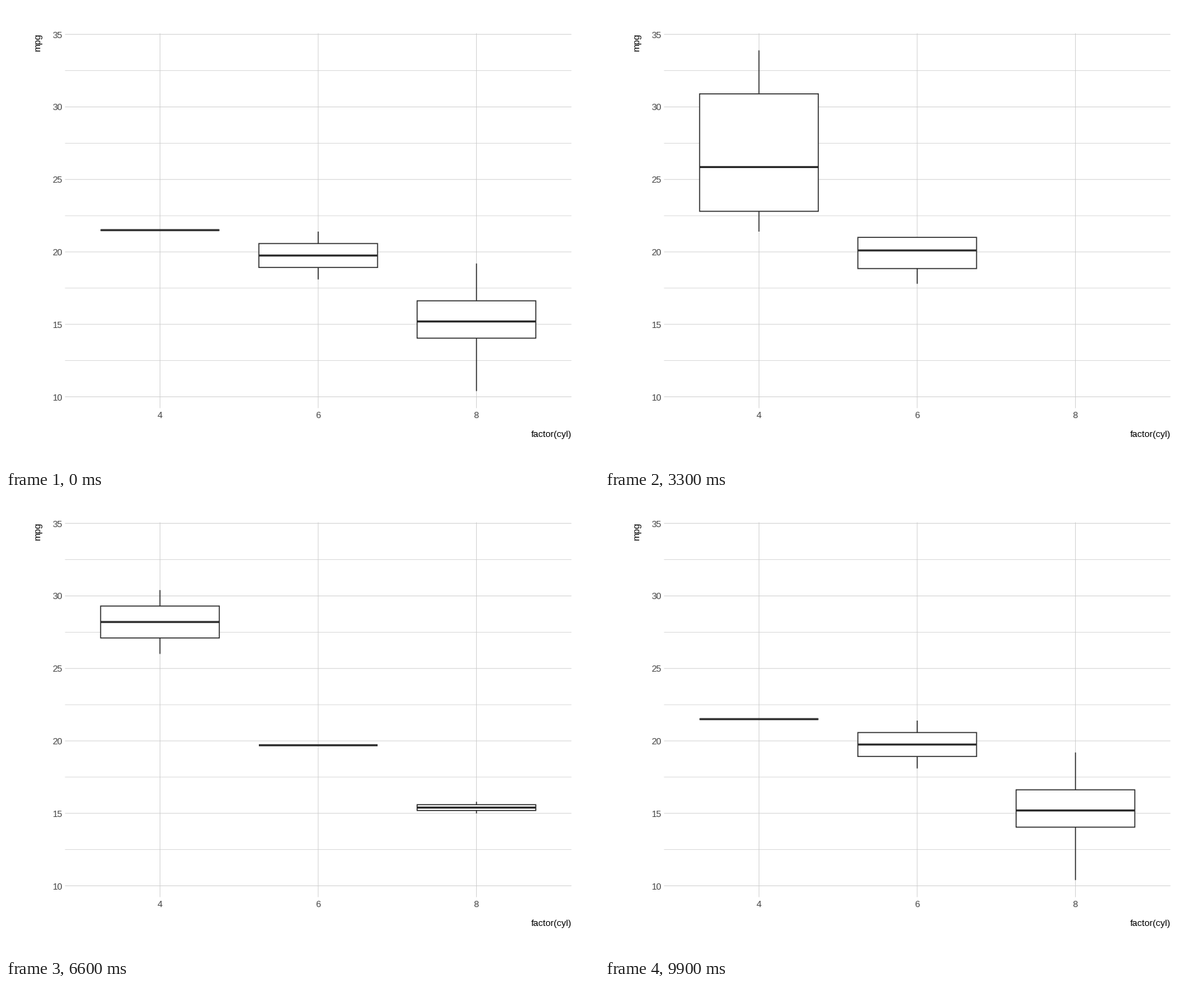
Recreate the animation shown at these times as a matplotlib script. Size 849x660 px, loop 10 s.

```python
import numpy as np
import matplotlib.pyplot as plt
from matplotlib.animation import FuncAnimation
from matplotlib.patches import Rectangle

W, H, DPI = 849, 660, 64
PX = 72 / DPI  # points per pixel
FRAMES, INTERVAL = 100, 100
INK, GRID = "#282828", "#cccccc"
LEFT, RIGHT, TOP, BOTTOM = 84.5, 809.5, 39.2, 575.7
STEP = (RIGHT - LEFT) / 3.2
HALF = 0.375 * STEP

# mpg by number of cylinders, one dict per number of gears (3, 4, 5)
GEARS = [
    {4: [21.5],
     6: [21.4, 18.1],
     8: [18.7, 14.3, 16.4, 17.3, 15.2, 10.4, 10.4, 14.7, 15.5, 15.2, 13.3, 19.2]},
    {4: [24.4, 22.8, 32.4, 30.4, 33.9, 27.3, 21.4, 22.8],
     6: [21.0, 21.0, 19.2, 17.8]},
    {4: [26.0, 30.4],
     6: [19.7],
     8: [15.8, 15.0]},
]
STATS = [{c: np.quantile(v, [0, 0.25, 0.5, 0.75, 1]) for c, v in g.items()}
         for g in GEARS]

# last still frame and number of steps of each transition
MOVES = [(16, 17), (49, 17), (83, 16)]


def xpos(cyl):
    return LEFT + STEP * (0.6 + (cyl - 4) / 2)


def ypos(mpg):
    return 559.6 - 20.757 * (mpg - 10)


def stats_at(frame):
    """Five-number summary of every visible box."""
    now = STATS[0]
    for k, (start, steps) in enumerate(MOVES):
        if frame <= start:
            break
        old, new = STATS[k], STATS[(k + 1) % 3]
        t = (frame - start) / steps
        if t >= 1:
            now = new
        else:
            # unmatched boxes leave or enter only when the move is over
            now = {c: s + (new[c] - s) * t if c in new else s
                   for c, s in old.items()}
    return now


fig = plt.figure(figsize=(W / DPI, H / DPI), dpi=DPI, facecolor="white")
ax = fig.add_axes([0, 0, 1, 1])
ax.set(xlim=(0, W), ylim=(H, 0))
ax.axis("off")


def line(xs, ys, width, color=INK, z=1):
    return ax.plot(xs, ys, color=color, lw=width * PX, zorder=z, snap=False,
                   solid_capstyle="butt")[0]


def label(x, y, text, size, color, **kw):
    ax.text(x, y, text, fontsize=size * PX, color=color,
            family="Liberation Sans", va="baseline", **kw)


for v in np.arange(10, 35.1, 2.5):
    major = v % 5 == 0
    line([LEFT, RIGHT], [ypos(v)] * 2, 0.8 if major else 0.65, GRID)
    if major:
        label(80.5, ypos(v) + 5, f"{v:.0f}", 13, "#444444", ha="right")
for cyl in (4, 6, 8):
    line([xpos(cyl)] * 2, [TOP, BOTTOM], 0.8, GRID)
    label(xpos(cyl), 590, str(cyl), 13, "#444444", ha="center")
label(RIGHT + 0.5, 617.5, "factor(cyl)", 13.3, "black", ha="right")
label(49.5, 39.5, "mpg", 13.3, "black", ha="right", rotation=90,
      rotation_mode="anchor")


class Box:
    def __init__(self, cyl):
        self.x = x = xpos(cyl)
        self.low = line([], [], 1.42, z=2)
        self.high = line([], [], 1.42, z=2)
        self.body = Rectangle((x - HALF, 0), 2 * HALF, 0, fc="white", ec=INK,
                              lw=1.42 * PX, joinstyle="miter", snap=False,
                              zorder=3)
        ax.add_patch(self.body)
        self.mid = line([], [], 2.84, z=4)
        self.parts = [self.low, self.high, self.body, self.mid]

    def update(self, stats):
        for p in self.parts:
            p.set_visible(stats is not None)
        if stats is None:
            return
        lo, q1, med, q3, hi = ypos(stats)
        self.low.set_data([self.x] * 2, [lo, q1])
        self.high.set_data([self.x] * 2, [q3, hi])
        self.body.set_y(q3)
        self.body.set_height(q1 - q3)
        self.mid.set_data([self.x - HALF, self.x + HALF], [med, med])


boxes = {cyl: Box(cyl) for cyl in (4, 6, 8)}


def draw(frame):
    now = stats_at(frame)
    for cyl, box in boxes.items():
        box.update(now.get(cyl))
    return [p for b in boxes.values() for p in b.parts]


anim = FuncAnimation(fig, draw, frames=FRAMES, interval=INTERVAL,
                     repeat=True, repeat_delay=0, blit=False)
plt.show()
```
